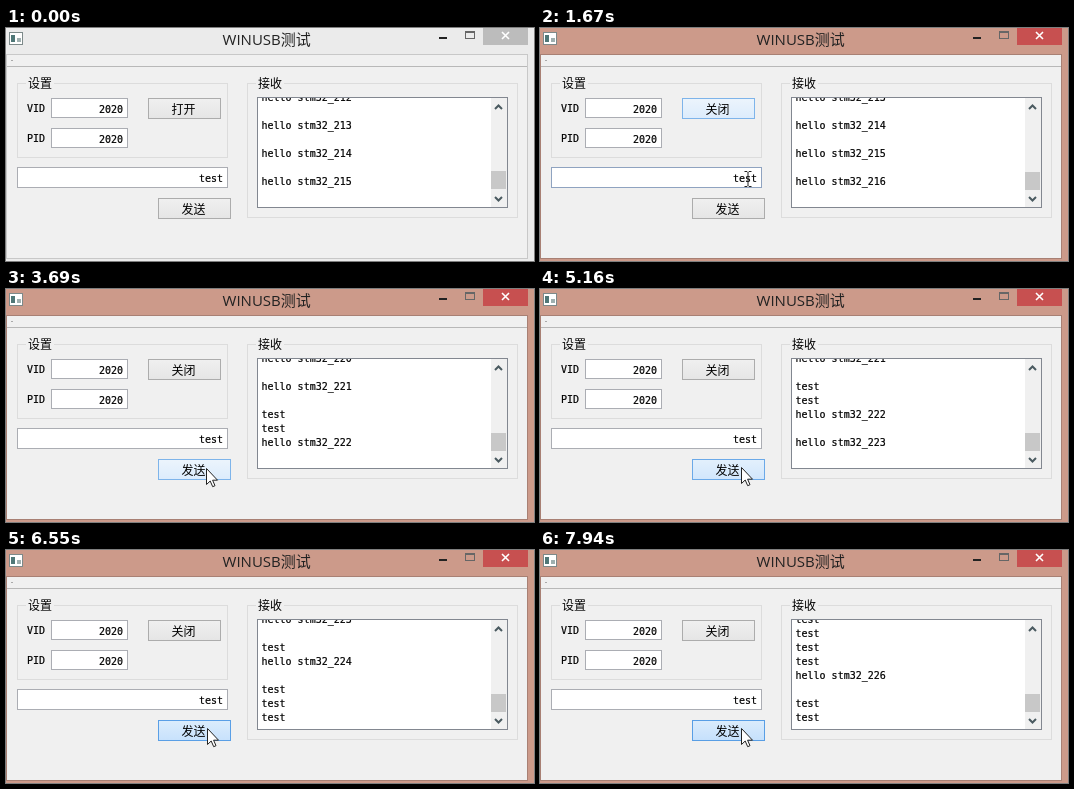
Animation of 528x233 px, one loop 8000 ms. Source, as an HTML page:

```html
<!DOCTYPE html>
<html lang="zh">
<head>
<meta charset="utf-8">
<style>
html, body { margin: 0; width: 100%; height: 100%; overflow: hidden; }
svg { display: block; }
text { font: 12px "Noto Sans CJK SC", "Noto Sans CJK", sans-serif; white-space: pre; }
.mono { font: 10px "DejaVu Sans Mono", monospace; stroke: #000; stroke-width: .2px; }
.end { text-anchor: end; }
.mid { text-anchor: middle; }
.title { font: 15px "Open Sans", "Noto Sans CJK SC", "Noto Sans CJK", sans-serif; fill: #222; }
</style>
</head>
<body>
<svg id="stage" width="528" height="233" viewBox="0 0 528 233">
  <defs>
    <linearGradient id="openFill" x2="0" y2="1"><stop/><stop offset="1"/></linearGradient>
    <linearGradient id="sendFill" x2="0" y2="1"><stop/><stop offset="1"/></linearGradient>
    <clipPath id="view"><rect x="252" y="70" width="233" height="109"/></clipPath>
  </defs>
</svg>
<script>
const LOOP = 8000;
const stage = document.getElementById('stage');

function add(tag, attrs, text = '', parent = stage) {
  const el = document.createElementNS('http://www.w3.org/2000/svg', tag);
  for (const k in attrs) el.setAttribute(k, attrs[k]);
  el.textContent = text;
  return parent.appendChild(el);
}
const fill = (x, y, width, height, color) => add('rect', { x, y, width, height, fill: color });
const box = (x, y, w, h, stroke, color = 'none') =>
  add('rect', { x: x + .5, y: y + .5, width: w - 1, height: h - 1, stroke, fill: color });
const label = (x, y, text, cls = '', parent) => add('text', { x, y, class: cls }, text, parent);
const line = (d, stroke, width = 1) =>
  add('path', { d, stroke, 'stroke-width': width, fill: 'none' });

// Window frame
const frame = fill(0, 0, 528, 233);
const close = fill(477, 0, 45, 17);
line('M496 4l7 7m0-7l-7 7', '#fff', 1.6);
fill(433, 9, 8, 2, '#222');
box(459, 3, 10, 8, '#666');
fill(459, 3, 10, 2, '#666');
box(3, 4, 14, 13, '#7d8a8a', '#fff');
fill(5, 7, 4, 7, '#4f7777');
fill(11, 10, 4, 4, '#9fb0b0');
label(216.5, 17, 'WINUSB测试', 'title');
const client = box(0, 26, 522, 205, '#bbb', '#f0f0f0');
line('M1 38.5H521', '#b8b8b8');
fill(5, 32, 2, 1, '#aaa');

// Settings and receive panels
function group(x, w, h, name) {
  box(x, 55, w, h, '#dcdcdc');
  fill(x + 9, 54, 28, 3, '#f0f0f0');
  label(x + 11, 60, name);
}
function field(x, y, w, h, value) {
  const el = box(x, y, w, h, '#abadb3', '#fff');
  label(x + w - 5, y + h / 2 + 4.5, value, 'mono end');
  return el;
}
group(11, 211, 75, '设置');
group(241, 271, 135, '接收');
label(21, 84, 'VID', 'mono');
label(21, 114, 'PID', 'mono');
field(45, 70, 77, 20, '2020');
field(45, 100, 77, 20, '2020');
const input = field(11, 139, 211, 21, 'test');

box(251, 69, 251, 111, '#828790', '#fff');
fill(485, 70, 16, 109, '#f0f0f0');
const thumb = fill(485, 143, 15, 18, '#c8c8c8');
line('M489 81l3.5-3.5 3.5 3.5M489 169l3.5 3.5 3.5-3.5', '#4a5a60', 2);
const view = add('g', { 'clip-path': 'url(#view)' });
const rows = Array.from({ length: 8 }, (_, i) => label(255.5, 73 + 14 * i, '', 'mono', view));

function button(x, y, id, name) {
  const rect = box(x, y, 73, 21, '#acacac', `url(#${id})`);
  const text = label(x + 35.5, y + 15.5, name, 'mid');
  return { rect, text, stops: document.querySelectorAll(`#${id} stop`) };
}
const open = button(142, 70, 'openFill', '打开');
const send = button(152, 170, 'sendFill', '发送');

const arrow = add('path', {
  d: 'M.5 .5V16.5L4.2 13L6.7 18.7L9 17.7L6.6 12.2H11.5Z', fill: '#fff', stroke: '#222'
});
const beam = line('M-3.5-7.5h2.5l1 1 1-1h2.5M0-6.5v13M-3.5 7.5h2.5l1-1 1 1h2.5', '#222');

// Greetings: four already there, a quick backlog after opening, then a steady beat
function helloTime(n) {
  if (n < 216) return 0;
  return n < 222 ? 1640 + (n - 216) * 132 : 3610 + (n - 222) * 1045;
}
// Three single clicks, then rapid clicking
const clicks = [2840, 3460, 5240];
for (let t = 6255; t < LOOP; t += 140) clicks.push(t);

const log = clicks.map(at => ({ at, lines: ['test'] }));
for (let n = 212; n < 227; n++) log.push({ at: helloTime(n), lines: ['hello stm32_' + n, ''] });
log.sort((a, b) => a.at - b.at);

const pointer = [[280, 224, 124], [640, 186, 77], [1510, 186, 77], [1670, 208, 151],
  [1755, 208, 151], [2300, 200, 179], [4620, 200, 179], [4700, 201, 178]];

const ramp = (t, from, to) => Math.min(1, Math.max(0, (t - from) / (to - from)));
const mix = (a, b, k) => a.map((v, i) => v + (b[i] - v) * k);
const rgb = c => `rgb(${c.map(Math.round)})`;
const press = (t, times) => Math.max(...times.map(at => 1 - ramp(Math.abs(t - at), 0, 150)));

function pointerAt(t) {
  const i = pointer.findIndex(k => k[0] > t);
  if (i < 1) return pointer[i ? pointer.length - 1 : 0].slice(1);
  const [a, b] = [pointer[i - 1], pointer[i]];
  return mix(a, b, ramp(t, a[0], b[0])).slice(1);
}

// Top, bottom and edge colours of an idle, hovered and pressed button
const shade = [[[240, 240, 240], [236, 244, 252], [218, 236, 252]],
  [[229, 229, 229], [220, 236, 252], [196, 224, 252]],
  [[172, 172, 172], [126, 180, 234], [86, 157, 229]]];
function paint({ rect, stops }, level) {
  const i = level < 1 ? 0 : 1;
  const [top, bottom, edge] = shade.map(s => rgb(mix(s[i], s[i + 1], level - i)));
  stops[0].setAttribute('stop-color', top);
  stops[1].setAttribute('stop-color', bottom);
  rect.setAttribute('stroke', edge);
}

function draw(t) {
  const active = ramp(t, 930, 1290);
  frame.setAttribute('fill', rgb(mix([235, 235, 235], [204, 154, 138], active)));
  close.setAttribute('fill', rgb(mix([188, 188, 188], [199, 80, 80], active)));
  client.setAttribute('stroke', rgb(mix([200, 200, 200], [168, 128, 116], active)));

  open.text.textContent = t < 1130 ? '打开' : '关闭';
  paint(open, ramp(t, 600, 830) - ramp(t, 1670, 1950) + press(t, [1130]));
  paint(send, ramp(t, 2140, 2300) + press(t, clicks));

  const lines = log.filter(e => e.at <= t).flatMap(e => e.lines).slice(-8);
  rows.forEach((row, i) => row.textContent = lines[i]);
  thumb.setAttribute('y', t < helloTime(216) ? 143 : 144);

  const [x, y] = pointerAt(t);
  const typing = y > 139 && y < 160;
  const at = `translate(${x} ${y})`;
  arrow.setAttribute('transform', at);
  beam.setAttribute('transform', at);
  arrow.setAttribute('visibility', t < 280 || typing ? 'hidden' : 'visible');
  beam.setAttribute('visibility', typing ? 'visible' : 'hidden');
  input.setAttribute('stroke', typing ? '#8fa3c0' : '#abadb3');
}

const start = performance.now();
function tick() {
  draw((performance.now() - start) % LOOP);
  requestAnimationFrame(tick);
}
tick();
</script>
</body>
</html>
```
